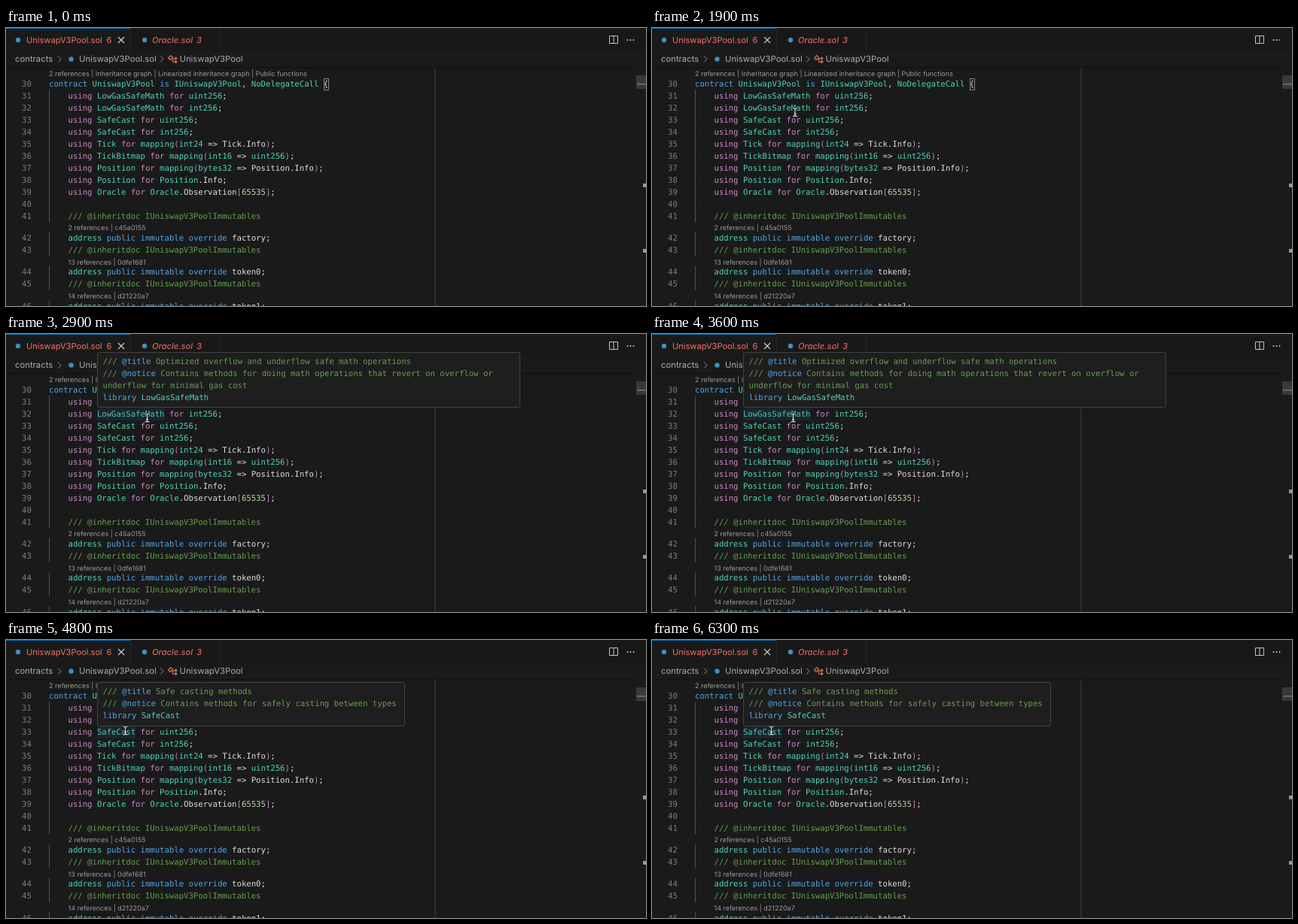
Recreate the animation shown at these times as an HTML page with a canvas. Size 850 by 370 pixels, loop 6.4 s.

```html
<!DOCTYPE html>
<html lang="en">
<head>
<meta charset="utf-8">
<title>Hover documentation</title>
<style>
  html, body { margin: 0; width: 100%; height: 100%; overflow: hidden; background: #1a1a1a; }
  canvas { display: block; }
</style>
</head>
<body>
<canvas id="stage" width="850" height="370"></canvas>
<script>
const ctx = document.getElementById('stage').getContext('2d');
const LOOP = 6400, STEP = 100, CHAR = 6.4;
const CODE = '10.63px "DejaVu Sans Mono", monospace';
const UI = 'Inter, sans-serif';
const color = {
  back: '#1a1a1a', bar: '#181818', plain: '#dedede', pink: '#cb88c5', blue: '#52a5e4',
  type: '#50d2b8', bracket: '#cc7acc', number: '#b9d4ac', comment: '#649f4f',
  dim: '#999', lineNo: '#787e84', error: '#f07265', file: '#3f8fbd', symbol: '#e8754f'
};

// First matching rule colours the token.
const rules = [
  [/^\/\/\/.*/, 'comment'],
  [/^(using|for)\b/, 'pink'],
  [/^(contract|is|public|immutable|override|library)\b/, 'blue'],
  [/^(=> [A-Z][\w.]+|\.\w+|factory|token\d)/, 'plain'],
  [/^[()[\]]/, 'bracket'],
  [/^\d+/, 'number'],
  [/^\w+/, 'type'],
  [/^(\s+|[^\w\s])/, 'plain']
];

// Line number, text
const code = [
  [30, 'contract UniswapV3Pool is IUniswapV3Pool, NoDelegateCall {'],
  [31, 'using LowGasSafeMath for uint256;'],
  [32, 'using LowGasSafeMath for int256;'],
  [33, 'using SafeCast for uint256;'],
  [34, 'using SafeCast for int256;'],
  [35, 'using Tick for mapping(int24 => Tick.Info);'],
  [36, 'using TickBitmap for mapping(int16 => uint256);'],
  [37, 'using Position for mapping(bytes32 => Position.Info);'],
  [38, 'using Position for Position.Info;'],
  [39, 'using Oracle for Oracle.Observation[65535];'],
  [40, ''],
  [41, '/// @inheritdoc IUniswapV3PoolImmutables'],
  [42, 'address public immutable override factory;'],
  [43, '/// @inheritdoc IUniswapV3PoolImmutables'],
  [44, 'address public immutable override token0;'],
  [45, '/// @inheritdoc IUniswapV3PoolImmutables'],
  [46, 'address public immutable override token1;']
];
const lenses = [
  [57, 64, '2 references | Inheritance graph | Linearized inheritance graph | Public functions'],
  [82.5, 269.3, '2 references | c45a0155'],
  [82.5, 314.5, '13 references | 0dfe1681'],
  [82.5, 359.7, '14 references | d21220a7']
];
const hovers = [
  { from: 2400, to: 4500, y: 24.5, w: 561, h: 73, wordY: 99, word: 'LowGasSafeMath', lines: [
    '/// @title Optimized overflow and underflow safe math operations',
    '/// @notice Contains methods for doing math operations that revert on overflow or',
    'underflow for minimal gas cost'] },
  { from: 4600, to: LOOP, y: 56.5, w: 408, h: 58, wordY: 115, word: 'SafeCast', lines: [
    '/// @title Safe casting methods',
    '/// @notice Contains methods for safely casting between types'] }
];
// Pointer moves: start, end, from, to
const moves = [
  [400, 1340, [523, 409], [190, 112]],
  [2000, 2400, [190, 112], [187.5, 111.5]],
  [3700, 4300, [187.5, 111.5], [158.5, 120.5]]
];

function rect(x, y, w, h, fill) {
  ctx.fillStyle = fill;
  ctx.fillRect(x, y, w, h);
}

function text(str, x, y, fill, font) {
  ctx.font = font;
  ctx.fillStyle = fill;
  ctx.fillText(str, x, y);
}

const tab = (str, x, fill, style = '') => text(str, x, 20, fill, `${style} 11.1px ${UI}`);
const crumb = (str, x) => text(str, x, 45.2, '#acacac', `11.3px ${UI}`);

function stroke(path, style, width = 1) {
  ctx.strokeStyle = style;
  ctx.lineWidth = width;
  ctx.stroke(new Path2D(path));
}

function dot(x, y, r, fill) {
  ctx.fillStyle = fill;
  ctx.beginPath();
  ctx.arc(x, y, r, 0, Math.PI * 2);
  ctx.fill();
}

function runs(parts, x, y) {
  for (const [str, kind] of parts) {
    text(str, x, y, color[kind], CODE);
    x += str.length * CHAR;
  }
}

function tokenize(line) {
  const parts = [];
  while (line) {
    const [pattern, kind] = rules.find(([p]) => p.test(line));
    const str = line.match(pattern)[0];
    parts.push([str, kind]);
    line = line.slice(str.length);
  }
  return parts;
}

const prose = line => line.split(/(@\w+)/).map(s => [s, s[0] === '@' ? 'blue' : 'comment']);

// Reference rows push the later lines down.
const baseline = n => 77.8 + (n - 30) * 16 + 13.3 * ((n > 41) + (n > 43) + (n > 45));

function drawHeader() {
  rect(0, 0, 850, 31, color.bar);
  rect(0, 0, 165, 31, color.back);
  rect(0, 0, 165, 1, '#0f6cab');
  rect(165, 0, 1, 31, '#262626');
  rect(284, 0, 1, 31, '#262626');

  dot(16, 16, 3.2, color.file);
  tab('UniswapV3Pool.sol', 27, color.error);
  tab('6', 133.5, color.error);
  stroke('M149 12l8 8m0 -8l-8 8', '#d0d0d0', 1.1);
  dot(184, 16, 3.2, color.file);
  tab('Oracle.sol', 194, '#d9655a', 'italic 500');
  tab('3', 253, '#d9655a', 'italic 500');

  stroke('M801.5 10.5h11v10h-11zM807 10.5v10', '#c5c5c5');
  for (const x of [825.5, 829.5, 833.5]) dot(x, 16, 1, '#c5c5c5');

  crumb('contracts', 12);
  dot(86.5, 41.5, 3.2, color.file);
  crumb('UniswapV3Pool.sol', 97);
  crumb('UniswapV3Pool', 230.5);
  stroke('M69 37.5l4 4l-4 4M205 37.5l4 4l-4 4', '#929292');
  stroke('M215.5 40l3.5 -3.5l2.5 2.5l-3.5 3.5zM220 41h4M221.5 41v4h2.5' +
    'M224 40.5l1.5 -1.5l1.5 1.5l-1.5 1.5zM224 45l1.5 -1.5l1.5 1.5l-1.5 1.5z', color.symbol, 1.1);
}

function drawEditor() {
  rect(0, 52, 837, 1.5, 'rgba(0,0,0,.3)');
  rect(569.5, 53, 1, 317, '#404040');
  for (const [n, line] of code) {
    const y = baseline(n), inner = n > 30;
    text(n, 21, y, color.lineNo, CODE);
    if (inner) rect(57, y - 11.5, 1, 16.2, '#505050');
    runs(tokenize(line), inner ? 82.5 : 57, y);
  }
  for (const [x, y, str] of lenses) text(str, x, y, color.dim, `9px ${UI}`);
  stroke('M422.5 67.5h6v15h-6z', '#888');

  rect(837, 63, 13, 18, '#393939');
  rect(838, 74, 12, 1.5, '#777');
  for (const y of [207, 294]) {
    rect(846, y, 2, 5, '#7fae5c');
    rect(848, y, 2, 5, '#d98a72');
  }
}

function drawHover({ y, w, h, wordY, word, lines }) {
  rect(121, wordY, word.length * CHAR, 16, 'rgba(50,110,160,.14)');
  ctx.beginPath();
  ctx.roundRect(121.5, y, w, h, 2);
  ctx.fillStyle = '#1e1e1e';
  ctx.fill();
  ctx.strokeStyle = '#434343';
  ctx.lineWidth = 1;
  ctx.stroke();
  lines.forEach((line, i) => runs(prose(line), 128.5, y + 15.5 + i * 16));
  runs(tokenize('library ' + word), 128.5, y + 15.5 + lines.length * 16);
}

function pointerAt(t) {
  let spot = moves[0][2];
  for (const [start, end, a, b] of moves) {
    if (t < start) break;
    const u = Math.min(1, (t - start) / (end - start)), k = u * u * (3 - 2 * u);
    spot = a.map((v, i) => v + (b[i] - v) * k);
  }
  return spot;
}

function drawPointer([x, y]) {
  const beam = `M${x - 3} ${y - 5.5}q3 0 3 2q0 -2 3 -2M${x} ${y - 4}v8.5` +
    `M${x - 3} ${y + 5.5}q3 0 3 -2q0 2 3 2M${x - 1.5} ${y + 2}h3`;
  stroke(beam, '#222', 2.4);
  stroke(beam, '#e4e4e4', 1.1);
}

function draw(now) {
  const t = Math.floor(now % LOOP / STEP) * STEP;
  rect(0, 0, 850, 370, color.back);
  drawHeader();
  drawEditor();
  for (const hover of hovers) if (t >= hover.from && t < hover.to) drawHover(hover);
  drawPointer(pointerAt(t));
}

ctx.textRendering = 'geometricPrecision';
const began = performance.now();
function tick() {
  draw(performance.now() - began);
  requestAnimationFrame(tick);
}
tick();
</script>
</body>
</html>
```
